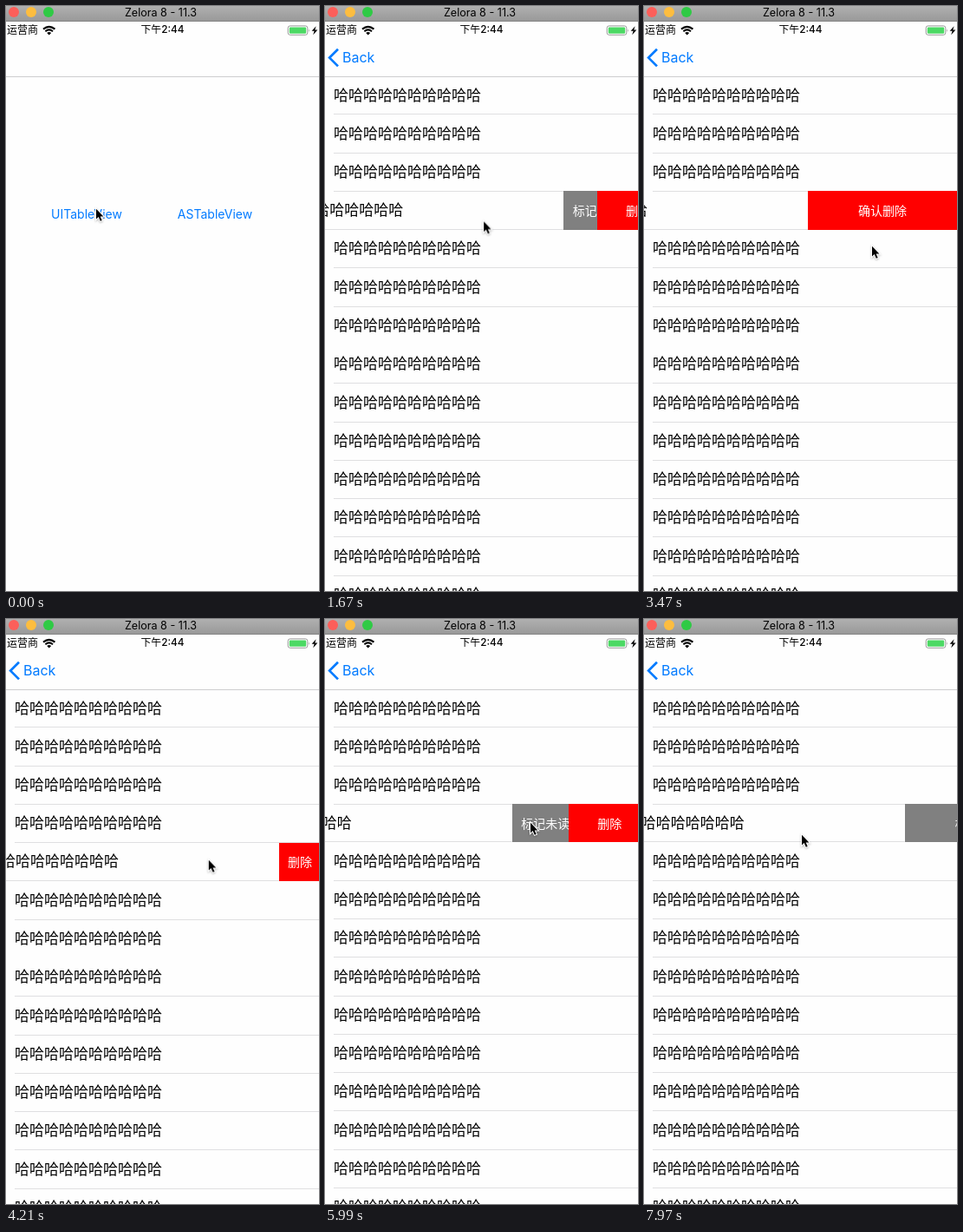
Recreate the animation shown at these times as an HTML page. Size 361 by 674 pixels, loop 8 s.

```html
<!DOCTYPE html>
<html lang="zh">
<head>
<meta charset="utf-8">
<title>Swipe actions</title>
<style>
@property --r { syntax: '<length>'; inherits: true; initial-value: 0px; }
@property --k { syntax: '<number>'; inherits: true; initial-value: .552; }
@property --c { syntax: '<number>'; inherits: true; initial-value: 0; }

html, body { margin: 0; width: 100%; height: 100%; overflow: hidden; background: #fefefe; }
body { font-family: Inter, 'Noto Sans CJK SC', 'Noto Sans CJK', sans-serif; color: #000; }
#stage { position: absolute; left: 0; top: 0; width: 361px; height: 674px; overflow: hidden; background: #fefefe; }
#stage * { position: absolute; white-space: nowrap; }

/* window frame, status bar, navigation bar */
#title { left: 0; top: 0; width: 361px; height: 18px; box-sizing: border-box; background: linear-gradient(#b0b0b0, #999); border-bottom: 1px solid #858585; }
#title b { left: 0; width: 357px; top: 0; text-align: center; font: 12.6px/15px Inter, sans-serif; }
#title i { top: 1px; width: 12px; height: 12px; border-radius: 50%; }
.status { top: 19px; font-size: 12px; line-height: 17px; }
#clock { left: 0; width: 361px; text-align: center; font-weight: 500; font-size: 11.8px; }
#line { left: 0; top: 81px; width: 361px; height: 1px; background: #cdcdcf; }
#back, #icons { left: 0; top: 0; width: 361px; height: 82px; }
#back { color: #007aff; animation: fade 8s infinite; }
#back span { left: 20px; top: 49px; font-size: 16px; line-height: 21px; animation: label 8s infinite; }
#back svg { left: 0; top: 44px; }

/* pages */
#view { left: 0; top: 82px; width: 361px; height: 592px; overflow: hidden; }
#home, #list { left: 0; top: -82px; width: 361px; height: 674px; }
#home { animation: leave 8s infinite; }
#home span { top: 230px; width: 120px; text-align: center; color: #007aff; font-size: 14px; line-height: 20px; }
#home .tap { animation: tap 8s infinite; }
#list { background: #fefefe; box-shadow: -6px 0 #fefefe; animation: enter 8s infinite; }
#below { left: 0; top: 258px; width: 361px; height: 416px; overflow: hidden; }
#rows { left: 0; top: -258px; width: 361px; height: 674px; animation: shift 8s infinite; }

.row { left: 0; width: 361px; --in: calc(-1 * var(--r) - min(4px, var(--r))); }
.row > p { margin: 0; left: 10px; font-size: 17px; line-height: 44px; transform: translateX(var(--in)); }
.row > u { left: 10px; right: 0; bottom: 0; height: 1px; background: #dfdfe1; transform: translateX(calc(-1 * var(--r))); }
.act { top: -1px; bottom: 0; right: 0; overflow: hidden; color: #fff; font-size: 14px; line-height: 45px; background: #f00; }
.act span { left: 0; top: 0; width: var(--w); text-align: center; }
.act span.ask { opacity: var(--c); }
.act span.del { opacity: calc(1 - var(--c)); }

#r4 { animation: open4 8s infinite linear, mode4 8s infinite linear, squeeze 8s infinite step-end; }
#r4 .mark { background: #808080; width: var(--r); --w: calc(172px * (1 - var(--k))); }
#r4 .trash { width: calc(var(--r) * var(--k)); --w: calc(172px * var(--k)); }
#r5 { animation: open5 8s infinite linear, mode5 8s infinite linear; }
#r5 .trash { top: 0; width: var(--r); line-height: 44px; }
#r5 .trash span { left: 10px; width: auto; }
#r5 > u { animation: gone 8s infinite step-end; }
#r7 > u { animation: come 8s infinite step-end; }
#cursor { left: -2px; top: -2px; animation: move 8s infinite ease-in-out; }

@keyframes enter {
  0%, 9.3125% { transform: translateX(361px); animation-timing-function: linear(0, .237, .552, .765, .884, .945, .9745, .9885, .995, .998, 1); }
  15.5625%, 100% { transform: none; }
}
@keyframes leave {
  0%, 9.3125% { transform: none; animation-timing-function: linear(0, .237, .552, .765, .884, .945, .9745, .9885, .995, .998, 1); }
  15.5625%, 100% { transform: translateX(-108px); }
}
@keyframes fade { 0%, 9.3125% { opacity: 0; } 13%, 100% { opacity: 1; } }
@keyframes label { 0%, 9.3125% { transform: translateX(90px); animation-timing-function: cubic-bezier(.2, .7, .2, 1); } 13.4%, 100% { transform: none; } }
@keyframes tap { 0%, 7.4% { opacity: 1; } 7.8%, 8.6% { opacity: .3; } 10.5%, 100% { opacity: 1; } }

@keyframes open4 {
  0%, 17.75% { --r: 0px; }
  22.5% { --r: 130px; animation-timing-function: ease-out; }
  25%, 46% { --r: 172px; animation-timing-function: cubic-bezier(.22, .61, .36, 1); }
  49.75%, 70.25% { --r: 0px; }
  73.625% { --r: 105px; }
  74.875% { --r: 145px; animation-timing-function: ease-out; }
  76.875%, 98.525% { --r: 172px; }
  99.625% { --r: 61px; }
  100% { --r: 42px; }
}
@keyframes mode4 {
  0%, 32.25% { --k: .552; --c: 0; }
  32.26% { --c: 1; }
  34%, 50% { --k: 1; }
  50% { --c: 1; }
  50.01%, 82.25% { --k: .552; --c: 0; }
  84.125%, 100% { --k: 0; --c: 0; }
}
@keyframes squeeze { 0% { height: 44px; } 67.7%, 100% { height: 43px; } }
@keyframes open5 {
  0%, 50.625% { --r: 0px; }
  52.625% { --r: 46px; }
  54.375% { --r: 62px; animation-timing-function: ease-out; }
  56.25%, 58.5% { --r: 48px; animation-timing-function: ease-out; }
  61.25%, 63.85% { --r: 77px; animation-timing-function: ease-in-out; }
  67.6%, 100% { --r: 0px; }
}
@keyframes mode5 { 0%, 58.5% { --c: 0; } 58.51%, 100% { --c: 1; } }
@keyframes shift {
  0%, 63.965% { transform: none; animation-timing-function: ease-in-out; }
  67.715%, 100% { transform: translateY(-45px); }
}
@keyframes gone { 0% { opacity: 1; } 63.9%, 100% { opacity: 0; } }
@keyframes come { 0% { opacity: 0; } 63.98%, 100% { opacity: 1; } }
@keyframes move {
  0%, .75% { transform: translate(103px, 232px); }
  6%, 9.5% { transform: translate(106px, 236px); }
  13.625% { transform: translate(217px, 267px); }
  17.25%, 17.75% { transform: translate(268px, 236px); animation-timing-function: linear; }
  22.5% { transform: translate(138px, 252px); }
  25% { transform: translate(190px, 280px); }
  28.875% { transform: translate(301px, 242px); }
  30.375%, 37% { transform: translate(302px, 243px); }
  42.5%, 46.5% { transform: translate(262px, 275px); }
  50%, 50.625% { transform: translate(279px, 272px); animation-timing-function: linear; }
  52.625% { transform: translate(233px, 276px); animation-timing-function: ease-out; }
  54.375% { transform: translate(217px, 277px); }
  57.5% { transform: translate(322px, 279px); }
  62%, 65.7% { transform: translate(320px, 278px); }
  69.75%, 70.25% { transform: translate(312px, 238px); animation-timing-function: linear; }
  73.625% { transform: translate(207px, 236px); }
  74.875% { transform: translate(236px, 233px); }
  84%, 94.8% { transform: translate(234px, 231px); }
  96.75%, 98.3% { transform: translate(202px, 301px); }
  99.6%, 100% { transform: translate(181px, 247px); }
}
</style>
</head>
<body>
<div id="stage">
  <div id="view">
    <div id="home">
      <span class="tap" style="left:33px">UITableView</span>
      <span style="left:181px">ASTableView</span>
    </div>
    <div id="list">
      <div id="below"><div id="rows"></div></div>
    </div>
  </div>

  <div id="line"></div>
  <div id="back">
    <svg width="20" height="32"><path d="M15 5.8 5.2 15.6l9.8 9.8" fill="none" stroke="#007aff" stroke-width="2.7"/></svg>
    <span>Back</span>
  </div>

  <div id="title">
    <i style="left:3px;background:#fc5f5a"></i>
    <i style="left:23px;background:#fdbd3f"></i>
    <i style="left:43px;background:#2fca45"></i>
    <b>Zelora 8 - 11.3</b>
  </div>
  <span class="status" style="left:1px">运营商</span>
  <span class="status" id="clock">下午2:44</span>
  <svg id="icons" width="361" height="82">
    <g fill="none" stroke="#000" stroke-width="2.1">
      <path d="M43 26.6q6.7-5.6 13.4 0M45.4 29.2q4.3-3.5 8.6 0"/>
    </g>
    <path d="M47.2 30.9q2.5-1.8 5 0l-2.5 2.6z"/>
    <rect x="325.2" y="22.9" width="22.6" height="10.4" rx="2.4" fill="none" stroke="#999"/>
    <rect x="326.8" y="24.5" width="19.4" height="7.2" rx="1.2" fill="#4cd964"/>
    <path d="M349 26.2q1.6 1.9 0 3.8z" fill="#999"/>
    <path d="M357.6 23.2l-5 5.6h3l-1.4 4.4 5.2-5.8h-3.1z"/>
  </svg>

  <svg id="cursor" width="18" height="24" viewBox="-2 -2 18 24">
    <path id="arrow" d="M1 1.8v11.8l2.7-2.5 2.1 4.7 1.9-.8-2-4.6h3.7z" stroke="#fff" stroke-width="2" paint-order="stroke" style="filter:drop-shadow(0 1px 1px #0004)"/>
  </svg>
</div>

<script>
const list = document.getElementById('list');
const rows = document.getElementById('rows');
const rowY = (i, bias = 0) => Math.max(81, Math.round(80.05 + bias + 44.28 * i));
const trash = '<div class="act trash"><span class="del">删除</span><span class="ask">确认删除</span></div>';
const actions = {
  4: '<div class="act mark"><span>标记未读</span></div>' + trash,
  5: trash
};

for (let i = 1; i <= 15; i++) {
  const row = document.createElement('div');
  const top = rowY(i - 1) + 1;
  const textTop = rowY(i - 1, .25) - top;
  row.className = 'row';
  row.id = 'r' + i;
  row.style.top = top + 'px';
  row.style.height = rowY(i) + 1 - top + 'px';
  row.innerHTML = `<p style="top:${textTop}px">${'哈'.repeat(10)}</p><u></u>${actions[i] || ''}`;
  (i < 5 ? list : rows).append(row);
}
</script>
</body>
</html>
```
